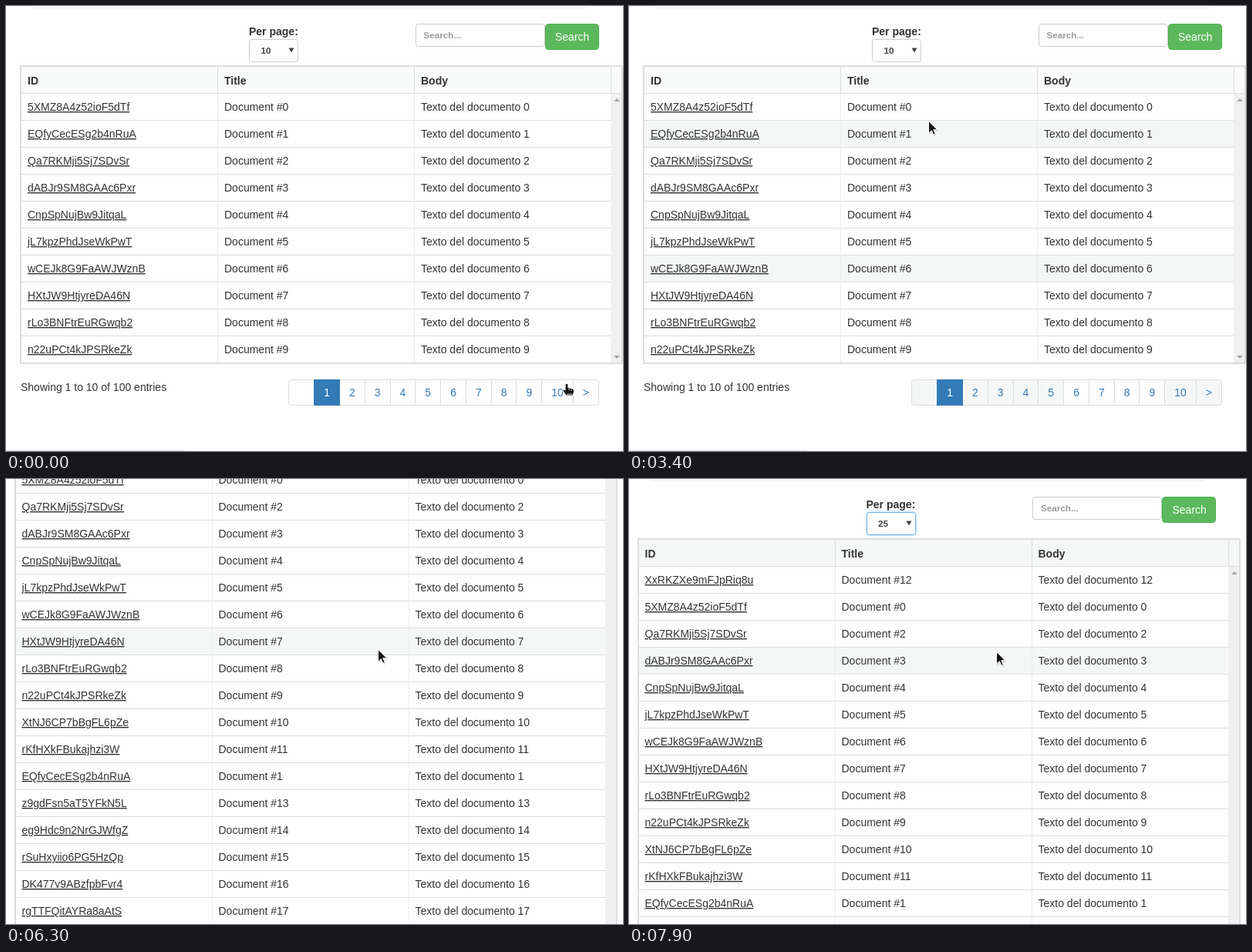
These frames come from a looping animation (800x578 px, 8 s). An HTML page:

```html
<!DOCTYPE html>
<html lang="es">
<head>
<meta charset="utf-8">
<title>Document table</title>
<style>
html, body { margin: 0; width: 100%; height: 100%; overflow: hidden; background: #fefefe; }
svg { display: block; }
text { font: 14px "Liberation Sans", Arial, sans-serif; fill: #333; white-space: pre; }
.b { font-weight: bold; }
.id { text-decoration: underline; text-decoration-skip-ink: none; }
.s { font-size: 11.67px; }
.tip { font: 14.67px "Open Sans", "Noto Sans", sans-serif; fill: #fff; }
</style>
</head>
<body>
<svg id="stage" width="800" height="578" viewBox="0 0 800 578">
  <defs>
    <filter id="soft" x="-100%" y="-100%" width="300%" height="300%"><feGaussianBlur stdDeviation="10"/></filter>
    <filter id="glow" x="-30%" y="-50%" width="160%" height="200%"><feGaussianBlur stdDeviation="2"/></filter>
  </defs>
  <g id="page"></g>
  <g id="over"></g>
  <g id="arrow">
    <path d="M1.500 2V18L5.500 14.500L8 20L10.500 19L8 13.500H13Z" fill="#000" opacity=".2"/>
    <path d="M.5 .5V16.200L4.300 12.700L6.800 18.300L9.300 17.200L6.800 11.700H11.800Z" fill="#111" stroke="#fff"/>
  </g>
  <g id="hand">
    <path d="M-2 1.500Q0 -1 2 1.500V5.500L8 7Q9.500 7.500 9.500 9.500V12L8 16H-1L-5 10Q-5.500 7 -2 8.500Z" fill="#111" stroke="#fff" stroke-width="1.200"/>
    <path d="M0 14.200H7M3 7V9.500M6 8V10" fill="none" stroke="#fff" stroke-width=".8"/>
  </g>
</svg>
<script>
const LOOP = 8000, STEP = 100, ROW = 35, HEAD = 114;
const $ = id => document.getElementById(id);

const ids = `5XMZ8A4z52ioF5dTf EQfyCecESg2b4nRuA Qa7RKMji5Sj7SDvSr dABJr9SM8GAAc6Pxr CnpSpNujBw9JitqaL
jL7kpzPhdJseWkPwT wCEJk8G9FaAWJWznB HXtJW9HtjyreDA46N rLo3BNFtrEuRGwqb2 n22uPCt4kJPSRkeZk
XtNJ6CP7bBgFL6pZe rKfHXkFBukajhzi3W XxRKZXe9mFJpRiq8u z9gdFsn5aT5YFkN5L eg9Hdc9n2NrGJWfgZ
rSuHxyiio6PG5HzQp DK477v9ABzfpbFvr4 rgTTFQitAYRa8aAtS PZvRTvFEhnzKXX3nx 37ioztXxNrFsvEo8N
aqqR9dWxcdrhYwP34 BP8i7whcmE56HHD8i ibSBGfXLvFFvH4DhK YmQuc4FzGiivcbixs BLtT2dvSWituvuYuX
vXi9yeHacSRc9LTxm SSkz7K27e2FMhBZDy gBow8HGN62iuKnn52 KFHX7gbuxRgemTFY5 deWvC9L3HbJTGpnjE`.split(/\s+/);

// seeded identifiers for the remaining rows
let seed = 7;
const letters = '23456789ABCDEFGHJKLMNPQRSTWXYZabcdefghijkmnopqrstuvwxyz';
const pick = () => letters[(seed = seed * 16807 % 2147483647) % letters.length];
while (ids.length < 40) ids.push(Array.from({ length: 17 }, pick).join(''));

// [time, x, y] of the pointer tip
const pointer = [
  [0, 727, 490], [100, 731, 493], [500, 746, 503], [1400, 746, 503], [1600, 712, 505],
  [2200, 383, 502], [3000, 383, 502], [3100, 312, 482], [3200, 378, 436], [3300, 391, 295],
  [3400, 388, 149], [3900, 360, 47], [4200, 366, 55], [5100, 366, 55], [5200, 357, 79],
  [5400, 352, 97], [5900, 352, 97], [6200, 482, 221], [6300, 482, 221], [6800, 476, 224]
];
const scrolling = [[6000, 0], [6300, 165], [6800, 469], [7400, 469], [7700, 0]];
const pages = [[0, 1], [800, 2], [1000, 3], [1400, 4], [2300, 3], [2800, 2], [3100, 1]];
// cells and rows that keep a light tint once touched
const cellTint = { 10: 300, 1: 800, 2: 1000, 3: 1400, '>': 1500, 5: 2000, 4: 2300, '<': 2400 };
const rowTint = { 6: 3300, 1: 3400 };

function at(keys, t) {
  let i = keys.findIndex(k => k[0] > t);
  if (i < 0) return keys[keys.length - 1].slice(1);
  if (i === 0) return keys[0].slice(1);
  const a = keys[i - 1], b = keys[i], p = (t - a[0]) / (b[0] - a[0]);
  return a.slice(1).map((v, n) => v + (b[n + 1] - v) * p);
}
const between = (t, a, b) => t >= a && t < b;
const esc = s => String(s).replace('<', '&lt;').replace('>', '&gt;');
const text = (x, y, s, cls = '', fill = '') =>
  `<text x="${x}" y="${y}" class="${cls}"${fill && ` style="fill:${fill}"`}>${esc(s)}</text>`;
const rect = (x, y, w, h, fill, more = '') =>
  `<rect x="${x}" y="${y}" width="${w}" height="${h}" fill="${fill}" ${more}/>`;
const poly = (pts, fill) => `<polygon points="${pts}" fill="${fill}"/>`;

function controls(t, big) {
  const d = big ? -7 : 0, e = big ? -8 : 0, s = big ? -7.5 : 0;
  const focus = t >= 4800;
  let out = rect(34 + d, 2, 720, 1, '#eee') + text(315 + s, 38, 'Per page:', 'b');
  if (focus) out += rect(315 + d, 43, 64, 30, '#66afe9', 'rx="4" opacity=".5" filter="url(#glow)"');
  out += rect(315.5 + d, 43.5, 63, 29, '#fefefe', `rx="3" stroke="${focus ? '#66afe9' : '#ccc'}"`);
  out += text(330.5 + s, 62, t >= 5700 ? 25 : 10, 'b s', '#444');
  out += poly(`${366.5 + d},54.5 ${373.5 + d},54.5 ${370 + d},60.5`, '#444');
  out += rect(531.5 + e, 23.5, 167, 29, '#fefefe', 'rx="3.5" stroke="#ccc"');
  out += text(541.5 + s, 42, 'Search...', 'b s', '#999');
  out += rect(699.5 + e, 23.5, 69, 33, '#5cb85c', 'rx="4" stroke="#4cae4c"');
  return out + text(712 + s, 45, 'Search', '', '#fff');
}

function table(rows, big, tinted) {
  const d = big ? -7 : 0, s = big ? -7.5 : 0;
  const end = HEAD + rows.length * ROW - 1;
  let out = rect(20 + d, 79, 779, 34, big ? '#f5f7f7' : '#f9fafa');
  rows.forEach((n, i) => {
    const y = HEAD + i * ROW;
    if (tinted(i)) out += rect(20 + d, y, 764, 34, '#f5f7f7');
    out += rect(20 + d, y + 34, 764, 1, '#ddd');
    out += text(28 + s, y + 22, ids[n], 'id');
    out += text(283 + s, y + 22, 'Document #' + n);
    out += text(538 + s, y + 22, 'Texto del documento ' + n);
  });
  for (const x of [274, 529]) {
    out += rect(x + d, 79, 1, 34, '#ddd') + rect(x + d, HEAD, 1, end - HEAD, '#ececec');
  }
  out += rect(784 + d, 79, 1, 34, '#ddd');
  out += rect(784 + d, HEAD, 15, end - HEAD, '#f0f0f0');
  out += rect(20 + d, 113, 779, 1, '#ddd');
  const c = 792 + d;
  out += poly(`${c - 4},124 ${c + 4},124 ${c},120`, '#a3a3a3');
  out += poly(`${c - 4},${end - 9} ${c + 4},${end - 9} ${c},${end - 5}`, '#a3a3a3');
  out += rect(19 + d, 78, 780, end - 77, 'none', 'stroke="#ddd" stroke-width="2"');
  ['ID', 'Title', 'Body'].forEach((h, i) => out += text(28 + 255 * i + s, 102, h, 'b'));
  return out;
}

function pager(t, page, count, big, end, tip) {
  const names = ['<', ...Array.from({ length: count }, (_, i) => String(i + 1)), '>'];
  const step = n => n === '10' ? 40.57 : n > 0 ? 32.78 : 33.18;
  const width = names.reduce((w, n) => w + step(n), 1);
  const top = end + 22;
  let x = 769 - width - (big ? 7.5 : 0), out = '', active = '';
  const x0 = Math.round(x);
  names.forEach(n => {
    const l = Math.round(x), w = Math.round(x + step(n)) - l;
    const off = n === '<' && page === 1;
    const hot = !off && !big && t >= 100 && between(tip[0], l, l + w) && between(tip[1], top, top + 34);
    const on = n === String(page);
    const fill = hot ? '#eee' : !big && t >= cellTint[n] ? '#f5f7f7' : '#fefefe';
    out += rect(l, top, w, 34, fill);
    if (n !== '<') out += rect(l, top, 1, 34, '#ddd');
    if (on) active = rect(l, top, w + 1, 34, '#337ab7');
    active += text(x + 13, top + 22, n, '', on ? '#fff' : off ? '#777' : hot ? '#23527c' : '#337ab7');
    x += step(n);
  });
  const w = Math.round(x + 1) - x0;
  return out + rect(x0 + .5, top + .5, w - 1, 33, 'none', 'rx="3.5" stroke="#ddd"') + active;
}

function dropdown(t) {
  const hot = t >= 5400 ? 1 : 0;
  let out = rect(320, 83, 56, 62, '#000', 'opacity=".4" filter="url(#soft)"');
  out += rect(315.5, 73.5, 63, 63, '#fefefe', 'stroke="#e9987a"');
  [10, 25, 50, 100].forEach((n, i) => {
    if (i === hot) out += rect(316, 73 + i * 15.5, 62, 16, '#f07746');
    out += text(330, 85 + i * 15.4, n, 's', i === hot ? '#fff3d8' : '#4c4c4c');
  });
  return `<g opacity="${t < 4900 ? .5 : 1}">${out}</g>`;
}

function tooltip(t) {
  return `<g opacity="${t < 7200 ? .5 : 1}">`
    + rect(492, 246, 108, 26, '#000', 'opacity=".4" filter="url(#soft)"')
    + rect(487, 238, 117, 26, '#2e2e2e') + text(495.5, 256, 'Document #16', 'tip') + '</g>';
}

function draw(t) {
  const big = t >= 5800, tip = at(pointer, t), scroll = Math.round(at(scrolling, t)[0]);
  const page = pages.filter(p => p[0] <= t).pop()[1];
  let rows;
  if (big) {
    // row 12 leads and row 1 takes its place
    rows = Array.from({ length: 25 }, (_, i) => i);
    rows.splice(12, 1, 1);
    rows.splice(0, 2, 12, 0);
  } else {
    rows = Array.from({ length: 10 }, (_, i) => (page - 1) * 10 + i);
  }
  const end = HEAD + rows.length * ROW - 1;
  const under = Math.floor((tip[1] + scroll - HEAD + 1) / ROW);
  const settled = !between(t, 7500, 7900) && !between(t, 4800, 6000);
  const tinted = i => settled && i === under || !big && t >= rowTint[i];
  const size = big ? 25 : 10, from = page === 1 ? 1 : (page - 1) * 10;

  $('page').setAttribute('transform', `translate(0 ${-scroll})`);
  $('page').innerHTML = controls(t, big) + table(rows, big, tinted)
    + text(19 - (big ? 7.5 : 0), end + 37, `Showing ${from} to ${page * size} of 100 entries`)
    + pager(t, page, big ? 4 : 10, big, end, tip);

  let over = '';
  if (t < 1100 || between(t, 2400, 3800)) over += rect(0, 577, 231, 1, '#dcdcdc');
  if (between(t, 4800, 5700)) over += dropdown(t);
  if (between(t, 7100, 7500)) over += tooltip(t);
  $('over').innerHTML = over;

  const isHand = t < 3100, spot = `translate(${tip.map(Math.round).join(' ')})`;
  $('hand').style.display = isHand ? '' : 'none';
  $('arrow').style.display = isHand ? 'none' : '';
  $(isHand ? 'hand' : 'arrow').setAttribute('transform', spot);
}

let last = -1;
const start = performance.now();
function tick(now) {
  const t = Math.floor(Math.max(0, now - start) % LOOP / STEP) * STEP;
  if (t !== last) draw(last = t);
  requestAnimationFrame(tick);
}
tick(start);
</script>
</body>
</html>
```
